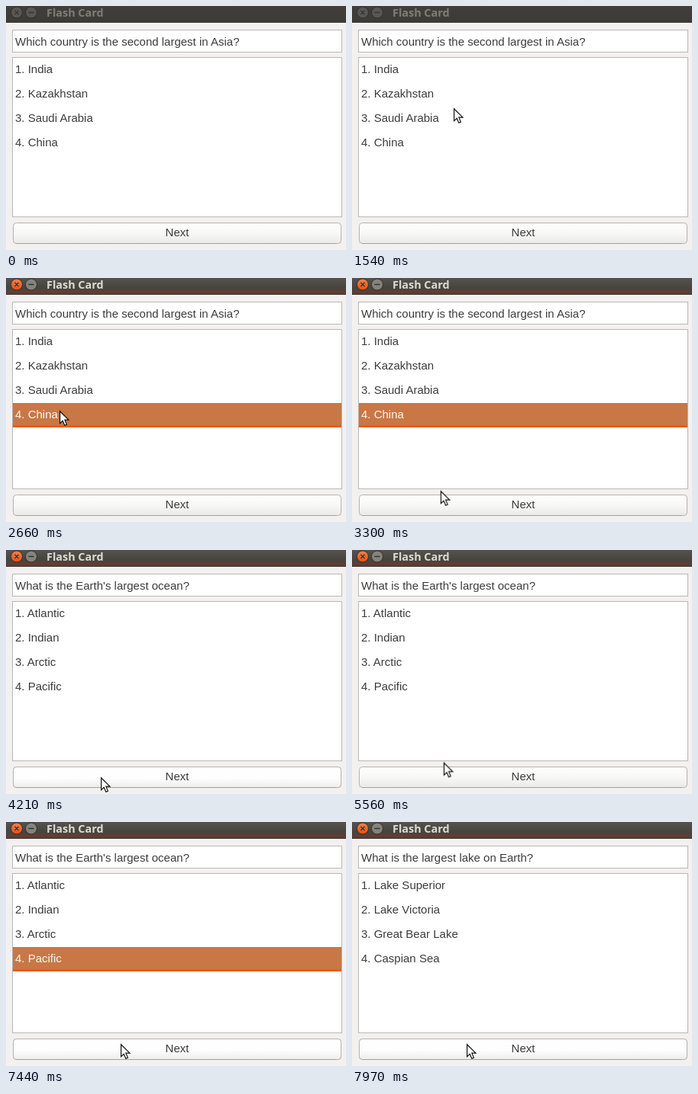
An HTML page that plays this animation: 445x320 px, repeating every 8000 ms.

```html
<!DOCTYPE html>
<html lang="en">
<head>
<meta charset="utf-8">
<title>Flash Card</title>
<style>
html, body { margin: 0; width: 100%; height: 100%; overflow: hidden; background: #f2f1f0; }
svg { display: block; width: 445px; height: 320px; font: 15px "Liberation Sans", Arial, sans-serif; fill: #3c3c3c; }
.title { font: 700 14.4px "Open Sans", "Noto Sans", sans-serif; }
.box { fill: #fff; stroke: #bbb7b3; }
.picked text { fill: #fff6ee; }
.timed { visibility: hidden; animation: 8s step-end infinite; }

#card1 { animation-name: card1; }
#card2 { animation-name: card2; }
#card3 { animation-name: card3; }
#pick1 { animation-name: pick1; }
#pick2 { animation-name: pick2; }
#pick3 { animation-name: pick3; }
#focus { animation-name: focus; }
#hover { animation-name: hover; }
#press { animation-name: press; }

@keyframes card1 { 0% { visibility: visible } 52.62%, 100% { visibility: hidden } }
@keyframes card2 { 52.62% { visibility: visible } 99.62%, 100% { visibility: hidden } }
@keyframes card3 { 99.62%, 100% { visibility: visible } }
@keyframes pick1 { 26.62% { visibility: visible } 33.24%, 100% { visibility: hidden } }
@keyframes pick2 { 33.24% { visibility: visible } 52.62%, 100% { visibility: hidden } }
@keyframes pick3 { 87.99% { visibility: visible } 99.62%, 100% { visibility: hidden } }
@keyframes focus { 26.12%, 100% { visibility: visible } }
@keyframes hover {
  10.87%, 41.9%, 92.99%, 100% { visibility: visible }
  11.87%, 69.49% { visibility: hidden }
}
@keyframes press {
  51.24%, 98.62% { visibility: visible }
  52.62%, 99.62%, 100% { visibility: hidden }
}

/* The pointer jumps once per sampled mouse event, hence steps. */
#pointer { animation: pointer 8s linear infinite; }
@keyframes pointer {
  0% { transform: translate(222px, 330px) }
  10.87% { transform: translate(222px, 330px); animation-timing-function: steps(7, start) }
  14.37% { transform: translate(172px, 183px) }
  17.24% { transform: translate(172px, 183px); animation-timing-function: steps(5, start) }
  19.74% { transform: translate(133px, 134px) }
  20.37% { transform: translate(133px, 134px); animation-timing-function: steps(7, start) }
  23.87% { transform: translate(87px, 90px) }
  28.87% { transform: translate(87px, 90px); animation-timing-function: steps(6, start) }
  31.87% { transform: translate(70px, 174px) }
  33.99% { transform: translate(70px, 174px); animation-timing-function: steps(13, start) }
  43.34% { transform: translate(124px, 298px) }
  68.99% { transform: translate(124px, 298px); animation-timing-function: steps(18, start) }
  77.99% { transform: translate(86px, 122px) }
  78.49% { transform: translate(86px, 122px); animation-timing-function: steps(2, start) }
  79.49% { transform: translate(86px, 117px) }
  80.37% { transform: translate(86px, 117px); animation-timing-function: steps(10, start) }
  85.37% { transform: translate(74px, 179px) }
  88.49% { transform: translate(74px, 179px); animation-timing-function: steps(10, start) }
  93.49%, 100% { transform: translate(150px, 291px) }
}
</style>
</head>
<body>
<svg viewBox="0 0 445 320">
  <defs>
    <linearGradient id="barIdle" x2="0" y2="1">
      <stop stop-color="#413f3b"/><stop offset="1" stop-color="#3c3b37"/>
    </linearGradient>
    <linearGradient id="barActive" x2="0" y2="1">
      <stop stop-color="#55534c"/><stop offset=".6" stop-color="#45443f"/>
      <stop offset=".75" stop-color="#593f37"/><stop offset="1" stop-color="#5c3e36"/>
    </linearGradient>
    <linearGradient id="closeFill" x2="0" y2="1">
      <stop stop-color="#f5804e"/><stop offset="1" stop-color="#e8500f"/>
    </linearGradient>
    <linearGradient id="btnIdle" x2="0" y2="1">
      <stop stop-color="#fefefe"/><stop offset=".5" stop-color="#f8f8f7"/><stop offset="1" stop-color="#eae9e7"/>
    </linearGradient>
    <linearGradient id="btnHover" x2="0" y2="1">
      <stop stop-color="#fff"/><stop offset=".55" stop-color="#fdfdfd"/><stop offset="1" stop-color="#eeedec"/>
    </linearGradient>
    <linearGradient id="btnPress" x2="0" y2="1">
      <stop stop-color="#cfcdca"/><stop offset="1" stop-color="#dddbd9"/>
    </linearGradient>
    <g id="strip">
      <rect x="9" y="68" width="430" height="32" fill="#c87745"/>
      <rect x="9" y="68" width="430" height="1" fill="#a1805f"/>
      <rect x="9" y="97" width="430" height="3" fill="#f05a12"/>
    </g>
  </defs>

  <rect width="445" height="320" fill="#f2f1f0"/>

  <g>
    <rect width="445" height="22" fill="url(#barIdle)"/>
    <g fill="#595751" stroke="#302f2c">
      <circle cx="14" cy="8.5" r="7.5"/><circle cx="33" cy="8.5" r="7.5"/>
    </g>
    <path d="M11.5 6l5 5m0-5l-5 5M29.5 8.5h7" stroke="#373632" stroke-width="1.4"/>
    <text class="title" x="53" y="14" fill="#817d75">Flash Card</text>
  </g>
  <g id="focus" class="timed">
    <rect width="445" height="22" fill="url(#barActive)"/>
    <rect y="21" width="445" height="1" fill="#3a302c"/>
    <g stroke="#33302c">
      <circle cx="14" cy="8.5" r="7.5" fill="url(#closeFill)"/><circle cx="33" cy="8.5" r="7.5" fill="#85837a"/>
    </g>
    <path d="M11.5 6l5 5m0-5l-5 5M29.5 8.5h7" stroke="#3a312b" stroke-width="1.4"/>
    <text class="title" x="53" y="14" fill="#dfdbd2">Flash Card</text>
  </g>

  <rect class="box" x="8.5" y="31.5" width="431" height="29"/>
  <rect class="box" x="8.5" y="67.5" width="431" height="209"/>

  <g id="card1" class="timed">
    <text x="12" y="52">Which country is the second largest in Asia?</text>
    <text x="12" y="88">1. India</text>
    <text x="12" y="120">2. Kazakhstan</text>
    <text x="12" y="152">3. Saudi Arabia</text>
    <text x="12" y="184">4. China</text>
  </g>
  <g id="card2" class="timed">
    <text x="12" y="52">What is the Earth's largest ocean?</text>
    <text x="12" y="88">1. Atlantic</text>
    <text x="12" y="120">2. Indian</text>
    <text x="12" y="152">3. Arctic</text>
    <text x="12" y="184">4. Pacific</text>
  </g>
  <g id="card3" class="timed">
    <text x="12" y="52">What is the largest lake on Earth?</text>
    <text x="12" y="88">1. Lake Superior</text>
    <text x="12" y="120">2. Lake Victoria</text>
    <text x="12" y="152">3. Great Bear Lake</text>
    <text x="12" y="184">4. Caspian Sea</text>
  </g>

  <g id="pick1" class="timed picked"><use href="#strip"/><text x="12" y="88">1. India</text></g>
  <g id="pick2" class="timed picked"><use href="#strip" y="96"/><text x="12" y="184">4. China</text></g>
  <g id="pick3" class="timed picked"><use href="#strip" y="96"/><text x="12" y="184">4. Pacific</text></g>

  <g stroke="#b5b1ac">
    <rect x="9.5" y="284.5" width="429" height="27" rx="4" fill="url(#btnIdle)"/>
    <rect id="hover" class="timed" x="9.5" y="284.5" width="429" height="27" rx="4" fill="url(#btnHover)"/>
    <rect id="press" class="timed" x="9.5" y="284.5" width="429" height="27" rx="4" fill="url(#btnPress)" stroke="#99958f"/>
  </g>
  <path d="M13 311.5h419" stroke="#a5a19c"/>
  <text x="224" y="302" text-anchor="middle">Next</text>

  <g id="pointer">
    <path d="M.6 .8V16.6L4.2 13.2 6.8 19.2 9.4 18.1 6.9 12.2H12Z" fill="#fff" stroke="#111" stroke-width="1.2"/>
  </g>
</svg>
</body>
</html>
```
